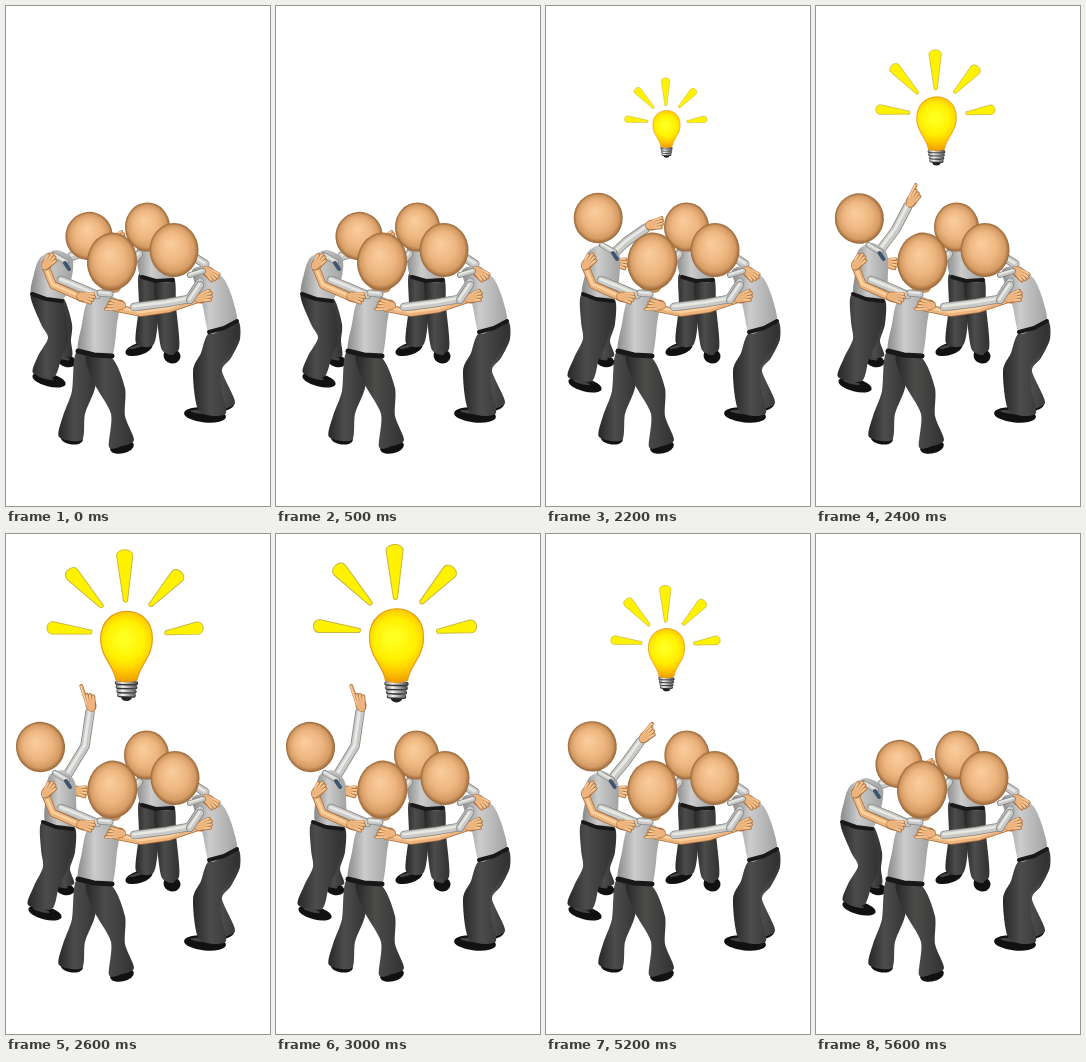
These frames come from a looping animation (264 by 500 pixels, 6600 ms). An HTML page with a canvas:

```html
<!DOCTYPE html>
<html>
<head>
<meta charset="utf-8">
<style>
html, body { margin: 0; width: 100%; height: 100%; overflow: hidden; background: #fff; }
canvas { display: block; }
</style>
</head>
<body>
<canvas id="stage" width="264" height="500"></canvas>
<script>
const g = document.getElementById('stage').getContext('2d');
const LOOP = 6600;
const CLOTH = ['#292929', '#4c4c4b', '#323232'];
const SHIRT = ['#8d8e8e', '#cbcccb', '#a2a3a3'];
const SKIN = ['#a9703f', '#eeb47d', '#fbd2a0'];
const SLEEVE = ['#858686', '#c9cac8', '#e9e9e4'];

// Piecewise linear value through [time, value] pairs
function track(t, keys) {
  if (t <= keys[0][0]) return keys[0][1];
  for (let i = 1; i < keys.length; i++) {
    const [t0, a] = keys[i - 1], [t1, b] = keys[i];
    if (t <= t1) return a + (b - a) * (t - t0) / (t1 - t0);
  }
  return keys[keys.length - 1][1];
}

// Blend of three poses, u from 0 to 2
function pose(u, a, b, c) {
  return a.map((v, i) => u < 1 ? v + (b[i] - v) * u : b[i] + (c[i] - b[i]) * (u - 1));
}

// Smooth closed shape through x,y pairs, shaded from left to right
function blob(p, tones) {
  const n = p.length / 2;
  const at = i => [p[(i + n) % n * 2], p[(i + n) % n * 2 + 1]];
  const xs = p.filter((_, i) => i % 2 === 0), k = 0.13;
  g.beginPath();
  g.moveTo(p[0], p[1]);
  for (let i = 0; i < n; i++) {
    const [a, b, c, d] = [at(i - 1), at(i), at(i + 1), at(i + 2)];
    g.bezierCurveTo(b[0] + (c[0] - a[0]) * k, b[1] + (c[1] - a[1]) * k,
      c[0] - (d[0] - b[0]) * k, c[1] - (d[1] - b[1]) * k, c[0], c[1]);
  }
  g.closePath();
  if (typeof tones === 'string') g.fillStyle = tones;
  else {
    const f = g.createLinearGradient(Math.min(...xs), 0, Math.max(...xs), 0);
    tones.forEach((c, i) => f.addColorStop([0, 0.4, 1][i], c));
    g.fillStyle = f;
  }
  g.fill();
}

function line(p, width, color) {
  g.beginPath();
  for (let i = 0; i < p.length; i += 2) g.lineTo(p[i], p[i + 1]);
  g.lineWidth = width;
  g.strokeStyle = color;
  g.stroke();
}

function limb(p, width, [rim, base, light]) {
  line(p, width, rim);
  line(p, width - 1.6, base);
  g.save();
  g.translate(-0.5, -0.8);
  line(p, width * 0.3, light);
  g.restore();
}

function oval(x, y, rx, ry, color, turn = 0) {
  g.beginPath();
  g.ellipse(x, y, rx, ry, turn, 0, 7);
  g.fillStyle = color;
  g.fill();
}

function head(x, y, rx, ry, turn = 0) {
  g.save();
  g.translate(x, y);
  g.rotate(turn);
  g.scale(rx, ry);
  const f = g.createRadialGradient(-0.15, -0.25, 0.05, 0, 0, 1);
  f.addColorStop(0, '#f9cc9b');
  f.addColorStop(0.55, '#edb681');
  f.addColorStop(0.85, '#d59b64');
  f.addColorStop(1, '#966537');
  oval(0, 0, 1, 1, f);
  g.restore();
}

function hand(x, y, turn, index = 10) {
  g.save();
  g.translate(x, y);
  g.rotate(turn);
  oval(0, 0, 7, 5.4, SKIN[0]);
  for (const [fy, len] of [[-4.5, index], [-1.5, 11], [1.7, 10], [4.6, 8]])
    limb([1, fy * 0.7, len, fy], 3.7, SKIN);
  oval(-0.5, -0.3, 6, 4.2, SKIN[1]);
  g.restore();
}

function shoe(x, y, rx, ry, turn) {
  oval(x, y, rx, ry, '#111', turn);
  oval(x - rx * 0.2, y - ry * 0.4, rx * 0.5, ry * 0.25, '#444', turn);
}

function backMan(sway) {
  shoe(133, 343, 14, 6, -0.3);
  shoe(166, 350, 8.5, 7.5, 0.2);
  blob([133, 268, 150, 275, 153, 300, 148, 338, 130, 337, 133, 300], CLOTH);
  blob([149, 272, 168, 272, 170, 300, 173, 343, 156, 344, 150, 300], CLOTH);
  blob([131, 243, 145, 238, 163, 246, 167, 274, 150, 276, 134, 269], SHIRT);
  line([136, 271, 150, 275, 167, 274], 4, '#181818');
  limb([133, 248, 124, 258], 8, SLEEVE);
  limb([160, 246, 188, 251, 199, 258], 9, SLEEVE);
  head(141.5 - sway, 221, 22.5, 24.5);
}

function leftMan(u, sway) {
  const mix = (a, b, c = b) => pose(u, a, b, c);
  const arm = mix([66, 250, 84, 244, 104, 238], [66, 249, 80, 236, 100, 222], [62, 240, 79, 212, 84, 178]);
  const [hx, hy, turn, index] = mix([108, 234, -0.4, 10], [106, 219, -0.25, 11], [85, 171, -1.83, 21]);
  limb(arm, 9.5, SLEEVE);
  hand(hx, hy, turn, index);
  if (u > 0.5) hand(71, 257, 0.1, 8);

  let [x1, y1, x2, y2] = mix([61, 355, 43, 374], [59, 355, 39, 379]);
  shoe(x1, y1, 9.5, 6, 0.2);
  shoe(x2, y2, 17, 6.5, 0.25);
  blob(mix([44, 292, 58, 293, 66, 318, 65, 335, 66, 350, 52, 350, 50, 325],
    [50, 292, 69, 294, 69, 318, 64, 335, 68, 350, 50, 351, 52, 325]), CLOTH);
  blob(mix([25, 288, 35, 318, 42, 332, 32, 350, 27, 367, 48, 371, 56, 350, 62, 334, 56, 294],
    [36, 288, 35, 315, 37, 333, 28, 352, 22, 371, 46, 375, 53, 352, 61, 335, 67, 295]), CLOTH);
  blob(mix([34, 252, 50, 244, 66, 252, 66, 270, 56, 294, 26, 289, 28, 268],
    [42, 246, 57, 238, 72, 246, 74, 262, 68, 294, 37, 289, 40, 265],
    [43, 242, 56, 236, 68, 246, 70, 262, 68, 294, 40, 289, 40, 262]), SHIRT);
  line(mix([26, 288, 40, 293, 56, 295], [37, 288, 50, 293, 67, 295]), 4, '#181818');
  const [cx, cy] = mix([55, 252], [63, 242], [56, 242]);
  limb([cx - 7, cy - 3, cx + 5, cy + 4], 6, SLEEVE);
  line([cx + 4, cy + 5, cx + 8, cy + 11], 4, '#40546f');
  const [x, y, r, tilt] = mix([83, 230, 23.5, 0.3], [52, 212, 24.5, 0], [34.5, 213, 24.5, -0.3]);
  head(x + sway * 0.4, y, r, r + 0.7, tilt);
}

function rightMan(sway) {
  shoe(219, 399, 10, 5.5, -0.3);
  shoe(199, 409, 21, 7.5, 0.1);
  blob([212, 324, 232, 315, 234, 333, 225, 352, 216, 365, 229, 396, 213, 401, 204, 368], CLOTH);
  blob([203, 327, 231, 318, 228, 340, 212, 367, 220, 407, 193, 405, 187, 365, 195, 347], CLOTH);
  blob([186, 265, 203, 260, 218, 273, 226, 291, 231, 315, 217, 323, 203, 327, 196, 297], SHIRT);
  line([203, 326, 218, 322, 231, 315], 4, '#181818');
  hand(202, 266, 0.65);
  limb([184, 269, 197, 265], 6, SLEEVE);
  head(168 + sway, 244, 24.5, 27);
}

function frontMan(sway) {
  shoe(66, 433, 11, 5.5, 0.1);
  shoe(116, 441, 12, 6.5, -0.2);
  blob([70, 347, 92, 352, 89, 382, 79, 408, 76, 434, 53, 431, 57, 410, 66, 385], CLOTH);
  blob([80, 350, 106, 352, 119, 382, 119, 410, 128, 434, 116, 440, 103, 441, 105, 408, 88, 377], CLOTH);
  blob([81, 296, 95, 288, 113, 295, 111, 318, 106, 350, 88, 349, 72, 344, 76, 318], SHIRT);
  line([72, 345, 88, 349, 106, 350], 5, '#181818');

  limb([55, 274, 70, 280, 91, 289], 8.5, SLEEVE);
  limb([40, 262, 47, 279, 74, 291], 8, SKIN);
  hand(41, 258, -0.9, 8);
  hand(77, 291, 0.15);

  limb([110, 302, 135, 307, 163, 303, 190, 294], 7.5, SKIN);
  hand(195, 292, -0.3);
  limb([194, 276, 183, 293, 160, 297, 128, 301], 8.5, SLEEVE);
  limb([194, 279, 184, 294], 8, SLEEVE);
  hand(113, 299, 3.2, 13);

  blob([95, 275, 117, 275, 112, 286, 98, 286], '#c68d58');
  limb([94, 287, 104, 288], 7, SLEEVE);
  head(106 + sway * 0.3, 255.5, 25, 29, 0.1);
}

function ray(x0, y0, x1, y1, w) {
  const len = Math.hypot(x1 - x0, y1 - y0);
  g.save();
  g.translate(x0, y0);
  g.rotate(Math.atan2(y1 - y0, x1 - x0));
  g.beginPath();
  g.moveTo(1, -2);
  g.lineTo(len - 6, -w);
  g.bezierCurveTo(len + 2, -w, len + 2, w, len - 6, w);
  g.lineTo(1, 2);
  g.quadraticCurveTo(-1, 0, 1, -2);
  g.fillStyle = '#fff200';
  g.fill();
  g.lineWidth = 1;
  g.strokeStyle = '#c9b43c';
  g.stroke();
  g.restore();
}

function bulb(s) {
  if (s <= 0) return;
  g.save();
  g.translate(120.5, 134.6 - 13.1 * s);
  g.scale(s, s);
  ray(-36, -25, -83, -30, 6.5);
  ray(-25, -51, -61, -90, 7.5);
  ray(-1, -56, -2, -111, 8.5);
  ray(24, -52, 57, -88, 7.5);
  ray(40, -24, 80, -30, 6.5);

  oval(0, 42, 6, 5, '#222');
  const metal = g.createLinearGradient(-12, 0, 12, 0);
  ['#777', '#f4f4f0', '#999', '#444'].forEach((c, i) => metal.addColorStop(i / 3, c));
  for (let i = 0; i < 4; i++) {
    const w = 12 - i * 0.8, y = 28 + i * 4.3;
    line([-w + 2, y, w - 2, y + 0.5], 4.4, '#333');
    line([-w + 2, y - 0.5, w - 2, y], 2.8, metal);
  }
  g.beginPath();
  g.moveTo(-11, 25);
  g.bezierCurveTo(-13, 10, -28, 0, -27, -19);
  g.bezierCurveTo(-26, -56, 27, -56, 27, -19);
  g.bezierCurveTo(28, 0, 13, 10, 11, 25);
  g.quadraticCurveTo(0, 29, -11, 25);
  const glow = g.createRadialGradient(-3, -18, 5, 0, -14, 40);
  glow.addColorStop(0, '#ffff20');
  glow.addColorStop(0.45, '#fff000');
  glow.addColorStop(0.75, '#ffc800');
  glow.addColorStop(1, '#f0a000');
  g.fillStyle = glow;
  g.fill();
  g.lineWidth = 1.2;
  g.strokeStyle = '#e59a18';
  g.stroke();
  g.restore();
}

function draw(now) {
  const t = Math.floor(now % LOOP / 100) * 100;
  const rise = track(t, [[1900, 0], [2200, 1], [2600, 2], [5000, 2], [5300, 1], [5600, 0]]);
  const size = track(t, [[1900, 0], [2200, 0.505], [2600, 0.957], [3000, 1], [5000, 1], [5300, 0.505], [5600, 0]]);
  const sway = track(t, [[0, 0], [200, 1], [300, 1], [500, 0], [900, 0], [1100, -1], [1200, -1],
    [1500, 1], [5000, 1], [5600, 0]]);
  g.fillStyle = '#fff';
  g.fillRect(0, 0, 264, 500);
  g.lineCap = g.lineJoin = 'round';
  backMan(sway);
  leftMan(rise, sway * (1 - rise / 2));
  rightMan(sway);
  frontMan(sway);
  bulb(size);
}

const start = performance.now();
function tick() {
  draw(performance.now() - start);
  requestAnimationFrame(tick);
}
tick();
</script>
</body>
</html>
```
